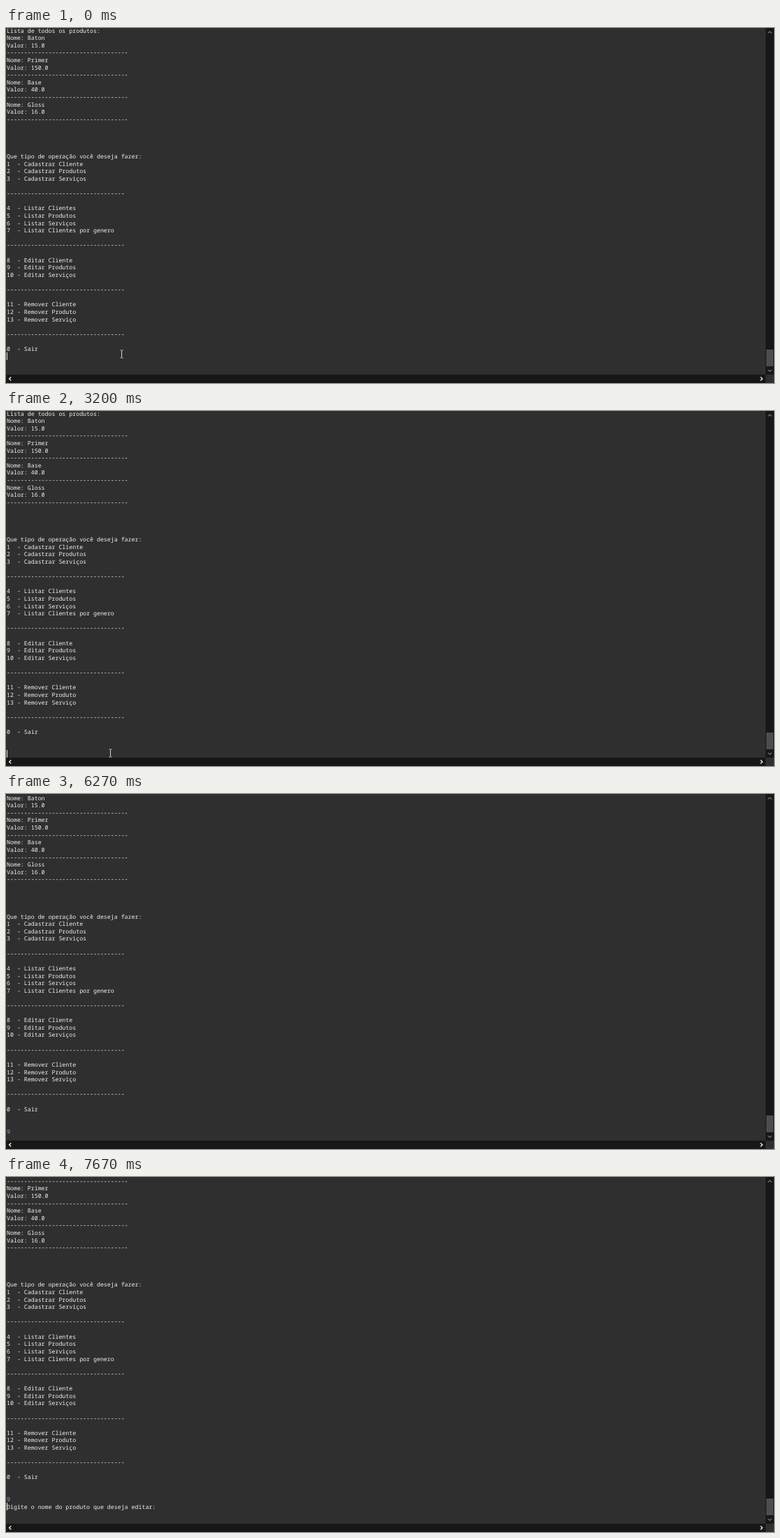
An HTML page with a canvas that plays this animation: 1099x509 px, repeating every 8000 ms.

```html
<!DOCTYPE html>
<html lang="pt">
<head>
<meta charset="utf-8">
<style>
  html, body { margin: 0; width: 100%; height: 100%; overflow: hidden; background: #2f2f2f; }
  canvas { display: block; }
</style>
</head>
<body>
<canvas id="stage" width="1099" height="509"></canvas>
<script>
const ctx = document.getElementById('stage').getContext('2d');
const LOOP = 8000, LINE = 10.62, FIRST_BASELINE = 6.5;
const rule = '-'.repeat(34);
const product = (name, price) => [`Nome: ${name}`, `Valor: ${price}`, rule + '-'];
const section = items => [...items, '', rule, ''];

const lines = [
  'Lista de todos os produtos:',
  ...product('Baton', '15.0'), ...product('Primer', '150.0'),
  ...product('Base', '40.0'), ...product('Gloss', '16.0'),
  '', '', '', '',
  'Que tipo de operação você deseja fazer:',
  ...section(['1  - Cadastrar Cliente', '2  - Cadastrar Produtos', '3  - Cadastrar Serviços']),
  ...section(['4  - Listar Clientes', '5  - Listar Produtos', '6  - Listar Serviços',
    '7  - Listar Clientes por genero']),
  ...section(['8  - Editar Cliente', '9  - Editar Produtos', '10 - Editar Serviços']),
  ...section(['11 - Remover Cliente', '12 - Remover Produto', '13 - Remover Serviço']),
  '0  - Sair'
];
const INPUT_LINE = 46, PROMPT_LINE = 47;

// Console state from each time on: scroll offset, caret line and column x
const states = [
  { at: 0, scroll: 0, line: 44, x: 1 },
  { at: 1067, scroll: 0, line: INPUT_LINE, x: 1 },
  { at: 4600, scroll: 0, line: INPUT_LINE, x: 6, typed: true },
  { at: 4730, scroll: 8.5, line: INPUT_LINE, x: 6, typed: true },
  { at: 6530, scroll: LINE, line: PROMPT_LINE, x: 1, typed: true },
  { at: 6600, scroll: 29.7, line: PROMPT_LINE, x: 1, typed: true, prompt: true }
];
const blinks = [330, 867, 1600, 2130, 2670, 3200, 3730, 4270, 5200, 5730, 6270, 6530, 7130, 7670];
const pointerPath = [
  [0, 165.5, 467.5], [330, 164.5, 468.5], [400, 162.5, 470.5], [470, 160.5, 472.5],
  [800, 158.5, 475.5], [867, 153.5, 484.5], [930, 149.5, 490.5]
];

function rect(x, y, w, h, color) {
  ctx.fillStyle = color;
  ctx.fillRect(x, y, w, h);
}

function stroke(points, color, width) {
  ctx.strokeStyle = color;
  ctx.lineWidth = width;
  ctx.beginPath();
  points.forEach(([x, y], i) => i ? ctx.lineTo(x, y) : ctx.moveTo(x, y));
  ctx.stroke();
}

function drawText(text, line, scroll, color = '#f0f0f0') {
  ctx.fillStyle = color;
  ctx.fillText(text, 1, FIRST_BASELINE + line * LINE - scroll);
}

function drawPointer(x, y) {
  const color = '#d8d8d8';
  stroke([[x, y - 5], [x, y + 5]], color, 1);
  for (const end of [-5.5, 5.5]) {
    stroke([[x - 2, y + end], [x - .5, y + end]], color, 1);
    stroke([[x + .5, y + end], [x + 2, y + end]], color, 1);
  }
}

function drawScrollbars() {
  rect(1087, 0, 12, 497, '#171717');
  rect(0, 497, 1087, 12, '#171717');
  rect(1087, 497, 12, 12, '#2f2f2f');
  rect(1088, 461, 10, 24, '#4d4d4d');
  stroke([[1090.3, 7.5], [1093, 5], [1095.7, 7.5]], '#777', 1.1);
  stroke([[1090.3, 490], [1093, 492.5], [1095.7, 490]], '#777', 1.1);
  stroke([[7.3, 500.4], [4.6, 503], [7.3, 505.6]], '#f0f0f0', 1.4);
  stroke([[1079.7, 500.4], [1082.4, 503], [1079.7, 505.6]], '#f0f0f0', 1.4);
}

function draw(time) {
  const state = states.findLast(s => s.at <= time);
  const { scroll } = state;
  ctx.font = '8.27px "Noto Sans Mono", "DejaVu Sans Mono", monospace';
  ctx.textRendering = 'geometricPrecision';

  rect(0, 0, 1099, 509, '#2f2f2f');
  lines.forEach((text, i) => drawText(text, i, scroll));
  if (state.typed) drawText('9', INPUT_LINE, scroll, '#87aec4');
  if (state.prompt) drawText('Digite o nome do produto que deseja editar:', PROMPT_LINE, scroll);

  const caretOn = blinks.filter(t => t <= time).length % 2 === 0;
  if (caretOn) {
    const top = Math.round(FIRST_BASELINE + state.line * LINE - scroll - 9);
    rect(state.x, top, 1, 11, '#e0e0e0');
  }
  drawScrollbars();
  if (!state.typed) {
    const [, x, y] = pointerPath.findLast(p => p[0] <= time);
    drawPointer(x, y);
  }
}

const start = performance.now();
function tick() {
  draw((performance.now() - start) % LOOP);
  requestAnimationFrame(tick);
}
tick();
</script>
</body>
</html>
```
